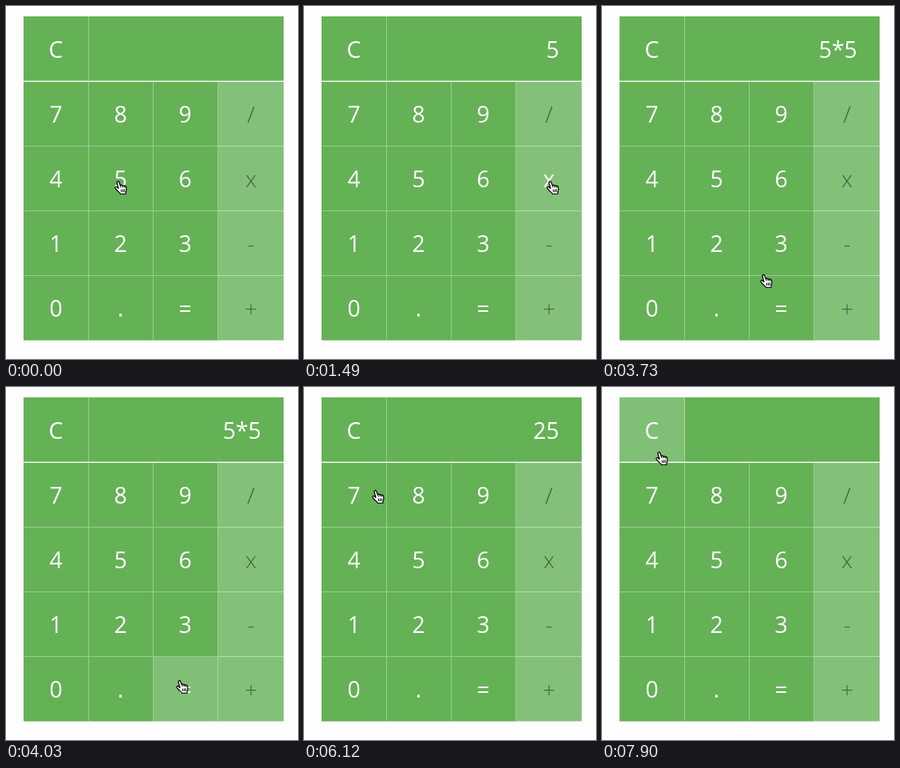
Write an HTML page that moves like this. It is 366x442 px and loops after 8000 ms.

```html
<!DOCTYPE html>
<html lang="en">
<head>
<meta charset="utf-8">
<title>Calculator</title>
<style>
  html, body { margin: 0; width: 100%; height: 100%; overflow: hidden; background: #fefefe; }
  svg { display: block; width: 366px; height: 442px; }
  text { font: 375 28.4px "Open Sans", "Noto Sans", sans-serif; fill: #fff; text-anchor: middle; }
  .key { fill: #65b156; }
  .op { fill: #83c179; }
  .lit { fill: #80bf76; }
  .dark { fill: #446440; font-weight: 330; }
  .line { fill: #fff; fill-opacity: .35; }
  .op ~ .line { fill-opacity: .42; }
  #display { text-anchor: end; }
</style>
</head>
<body>
<svg viewBox="0 0 366 442">
  <g id="keys"></g>
  <text id="display" x="319.8" y="64.6"></text>
  <g id="hand" stroke="#000" stroke-width="1.25" stroke-linejoin="round" stroke-linecap="round">
    <path fill="#fff" d="M3 2 C3.2 .4 5.2 .3 5.8 1.8 L7.4 5.8 C8.2 4.7 9.6 4.9 10 6.1 C10.8 5.3 12 5.5 12.4 6.7
      C13.3 6.1 14.5 6.6 14.7 7.9 C15.2 10.2 15 11.7 14.2 13.4 L14 16.2 L7.6 16.5 C6.9 14.7 4.5 13.6 2.8 11.3
      L1 9.1 C.4 7.8 1.9 7 3 7.8 L5 9.4 Z"/>
    <path fill="none" stroke-width="1" d="M7.4 5.8 L8.2 8 M10 6.1 L10.6 8 M12.4 6.7 L12.8 8.3 M8.2 11 L8.8 13.8 M10.3 10.8 L10.7 13.6 M12.3 10.6 L12.4 13.4"/>
  </g>
</svg>
<script>
const LOOP = 8000;
const TICK = 147.5;     // the pointer advances once per tick
const PITCH = 81;
const LEFT = 22, TOP = 13, RIGHT = 348, BOTTOM = 419;
const LABELS = ['C', '789/', '456x', '123-', '0.=+'];

// Pointer moves: start ms, ticks, end x, end y, sag of the path
const HOME = [136, 219];
const MOVES = [
  [150, 1, 136, 220, 0],
  [900, 5, 304, 219, 10],
  [2240, 5, 142, 218, 1],
  [3580, 5, 214, 368, 0],
  [5820, 6, 67, 64, 62],
  [7900, 1, 67, 81, 0]
];

// Keys pressed at an even pace; a space is a pause
const PRESSES = '5*5= C';
const FIRST_PRESS = 450, PRESS_GAP = 1340;

const $ = id => document.getElementById(id);
const keys = {};

function add(parent, tag, attrs = {}) {
  const el = document.createElementNS('http://www.w3.org/2000/svg', tag);
  for (const name in attrs) el.setAttribute(name, attrs[name]);
  return parent.appendChild(el);
}

const rect = (parent, x, y, width, height, cls) =>
  add(parent, 'rect', { x, y, width, height, class: cls });

// A cell owns the hairlines on its right and bottom edges.
function addCell(r, c, span = 1) {
  const cell = add($('keys'), 'g');
  const isOp = r > 0 && c === 3;
  const x = c ? LEFT + 1 + PITCH * c : LEFT;
  const y = TOP + PITCH * r + (r > 0 ? 0.5 + 0.5 * (r === 1) : 0) | 0;
  const right = c + span === 4 ? RIGHT : LEFT + 1 + PITCH * (c + span);
  const bottom = r === 4 ? BOTTOM : TOP + PITCH * (r + 1) + (r > 0);
  const top = r > 1 ? y + 1 : y;
  const box = rect(cell, x, top, right - x, bottom - top, isOp ? 'op' : 'key');
  if (right < RIGHT) rect(cell, right - 1, top, 1, bottom - top - 1, 'line');
  rect(cell, x, bottom - 1, right - x, 1, 'line');
  return { cell, box, isOp };
}

function build() {
  LABELS.forEach((row, r) => [...row].forEach((label, c) => {
    const key = addCell(r, c);
    key.text = add(key.cell, 'text', {
      x: 62.5 + PITCH * c + (key.isOp ? 1.5 : 0),
      y: 64.6 + PITCH * r,
      class: key.isOp ? 'dark' : ''
    });
    key.text.textContent = label;
    keys[label] = key;
  }));
  addCell(0, 1, 3);
}

function pointerAt(t) {
  let [x, y] = HOME;
  for (const [start, ticks, toX, toY, sag] of MOVES) {
    if (t < start) break;
    const step = Math.min(ticks, Math.floor((t - start) / TICK) + 1);
    const p = 1 - (1 - step / ticks) ** 3;
    x += (toX - x) * p;
    y += (toY - y) * p + sag * 4 * p * (1 - p);
  }
  return [Math.round(x), Math.round(y)];
}

function displayAt(t) {
  const count = Math.max(0, Math.floor((t - FIRST_PRESS) / PRESS_GAP) + 1);
  return [...PRESSES.slice(0, count)].reduce((shown, key) => {
    if (key === 'C') return '';
    if (key === '=') return String(shown.split('*').reduce((a, b) => a * b));
    return shown + key.trim();
  }, '');
}

// Digits do not react; operators turn white, C and = turn light.
function setHover([x, y]) {
  const row = LABELS[Math.floor((y + 1 - TOP) / PITCH)];
  const over = row[Math.floor((x + 4 - LEFT) / PITCH)];
  for (const label of 'x=C') {
    const { box, text, isOp } = keys[label];
    const on = label === over;
    if (isOp) text.setAttribute('class', on ? '' : 'dark');
    else box.setAttribute('class', on ? 'lit' : 'key');
  }
}

function draw() {
  const t = performance.now() % LOOP;
  $('hand').setAttribute('transform', `translate(${pointerAt(t)})`);
  $('display').textContent = displayAt(t);
  setHover(pointerAt(t - TICK));   // hover trails the pointer by one tick
  requestAnimationFrame(draw);
}

build();
draw();
</script>
</body>
</html>
```
